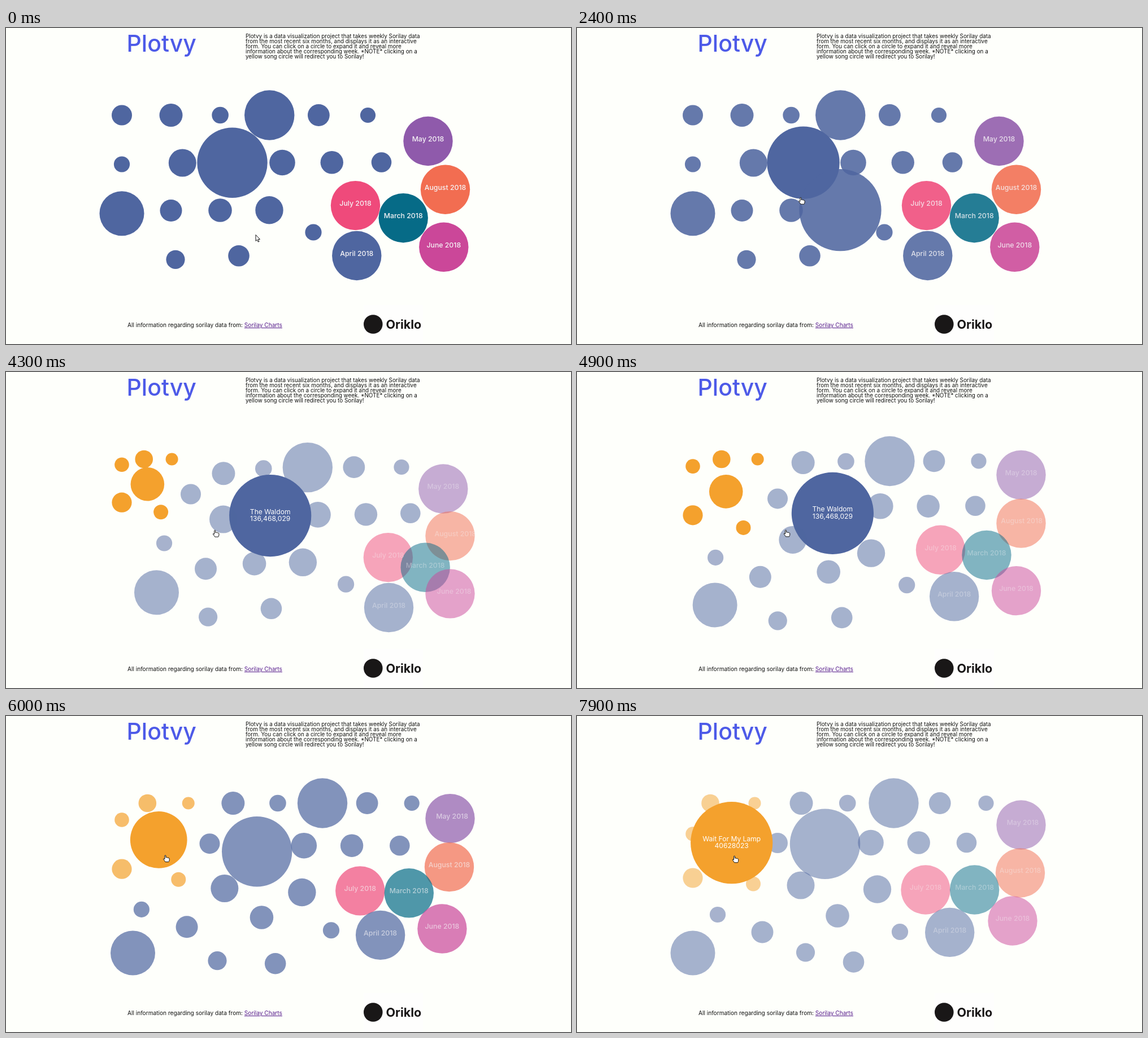
Animation, 1000 px wide and 560 px high, one loop 8 s. Source, as an HTML page:

```html
<!DOCTYPE html>
<html lang="en">
<head>
<meta charset="utf-8">
<title>Plotvy</title>
<style>
  html, body { margin: 0; width: 100%; height: 100%; overflow: hidden; background: #fefffb; }
  svg { display: block; width: 100%; height: 100%; }
  text { font-family: Montserrat, Inter, sans-serif; }
  .title { font-size: 41px; font-weight: 500; fill: #4d5ae8; }
  .intro { font-size: 9.9px; fill: #111; }
  .foot { font-size: 10.15px; fill: #111; }
  .link { fill: #551a8b; text-decoration: underline; }
  .mark { font-size: 21.5px; font-weight: 700; fill: #191717; }
  .month { font-size: 12.3px; font-weight: 500; fill: #f6f4f6; text-anchor: middle; }
  .label { font-size: 12.1px; fill: #fff; text-anchor: middle; }
</style>
</head>
<body>
<svg viewBox="0 0 1000 560">
  <rect width="1000" height="560" fill="#fefffb"/>
  <text class="title" x="213.5" y="42">Plotvy</text>
  <g id="intro"></g>
  <text class="foot" x="215" y="530">All information regarding sorilay data from: <tspan class="link">Sorilay Charts</tspan></text>
  <rect x="633" y="491" width="105" height="69" fill="#fefefd"/>
  <circle cx="649.8" cy="525" r="16.8" fill="#191717"/>
  <text class="mark" x="672.5" y="532.5">Oriklo</text>
  <g id="dots"></g>
  <g id="texts"></g>
  <g id="cursor" fill="#fff" stroke="#111" stroke-width="1" stroke-linejoin="round">
    <path id="arrow" d="M0 0V11L2.5 8.7L4.2 12.6L6 11.8L4.3 8H7.5Z"/>
    <path id="hand" d="M-1 1Q-1 0 0 0Q1 0 1 1V4Q3 3.4 3.5 4.4Q5.5 4 6 5Q7.3 5 7.3 6.5L7 9.5Q6.5 11 6 11.8H0Q-1 10 -3 7.5Q-3.8 6 -2.5 6L-1 7Z"/>
  </g>
</svg>
<script>
const LOOP = 8000, STEP = 100;
const BLUE = '#4f66a0', ORANGE = '#f4a12d';
const BURST = 4000, FOCUS_R = 72.6, MONTH_R = 43.7, MAX_X = 786;
const corner = [205, 154.5];

const $ = id => document.getElementById(id);
const mix = (a, b, p) => a + (b - a) * p;
const ramp = (t, from, length) => Math.max(0, Math.min(1, (t - from) / length));
const show = (el, on) => el.setAttribute('visibility', on ? 'visible' : 'hidden');
function add(parent, tag, attrs, content = '') {
  const el = document.createElementNS('http://www.w3.org/2000/svg', tag);
  for (const k in attrs) el.setAttribute(k, attrs[k]);
  el.textContent = content;
  $(parent).appendChild(el);
  return el;
}

[
  'Plotvy is a data visualization project that takes weekly Sorilay data',
  'from the most recent six months, and displays it as an interactive',
  'form. You can click on a circle to expand it and reveal more',
  'information about the corresponding week. *NOTE* clicking on a',
  'yellow song circle will redirect you to Sorilay!'
].forEach((line, i) => add('intro', 'text', { class: 'intro', x: 424, y: 17.7 + 9 * i }, line));

// Walks through [time, x, y] stops; each leg eases out by the given power
function along(stops, t, power) {
  const next = stops.findIndex(s => t < s[0]);
  if (next === 0) return stops[0].slice(1);
  if (next < 0) return stops[stops.length - 1].slice(1);
  const [a, b] = [stops[next - 1], stops[next]];
  const p = 1 - (1 - ramp(t, a[0], b[0] - a[0])) ** power;
  return [mix(a[1], b[1], p), mix(a[2], b[2], p)];
}

// New circles in the corner push the others away; the right wall takes up the shock
function pushed([x, y]) {
  const [dx, dy] = [x - corner[0], y - corner[1]];
  const room = Math.min(1, (840 - x) / 200);
  return [
    x + room * (56 + 66 * Math.exp(-Math.hypot(dx / 150, dy / 70))),
    y + room * (14 + 48 * Math.exp(-dx / 60))
  ];
}

const dots = [];
function dot(r, start, settle, rest, opts) {
  const d = { r, fill: BLUE, born: 0, burst: pushed(start), text: [], ...opts };
  d.stops = [[BURST, ...start], [4300, ...d.burst], [5400, ...settle], [7900, ...rest]];
  d.el = add('dots', 'circle', { fill: d.fill });
  if (d.month) d.text = [add('texts', 'text', { class: 'month' }, d.month)];
  if (d.lines) d.text = d.lines.map(s => add('texts', 'text', { class: 'label' }, s));
  dots.push(d);
}
// Evenly spaced circles between two end places, for each of the three poses
function row(radii, ...poses) {
  radii.forEach((r, i) => {
    const p = i / (radii.length - 1);
    dot(r, ...poses.map(([x1, y1, x2, y2]) => [mix(x1, x2, p), mix(y1, y2, p)]));
  });
}
function song(r, settle, rest, opts) {
  const burst = corner.map((c, i) => mix(c, settle[i], .72));
  dot(r, corner, settle, rest, { fill: ORANGE, born: BURST + STEP, burst, ...opts });
}
const month = (name, fill, ...poses) => dot(MONTH_R, ...poses, { fill, month: name + ' 2018' });

row([20.5, 14.8, 44.2, 19.4, 13.6],
  [292, 154.5, 640.5, 154.5], [405, 154.5, 714.5, 154.5], [397, 154.5, 724, 154.5]);
row([22.8, 20.2, 17.8],
  [489, 238.5, 664.5, 238], [532, 233, 701.5, 233], [520, 224.5, 689.5, 224.5]);
dot(18, corner, [364, 227], [355, 225]);
dot(14.1, [205, 241.5], [234, 337], [249, 352]);
dot(39.5, [205, 328.7], [237, 420], [205, 420]);
dot(19.5, [292, 323.5], [315, 368], [328, 383]);
dot(20.8, [379, 323], [447, 359], [461, 354]);
dot(14.6, [544, 362], [578, 378], [571.5, 382.5]);
dot(16.6, [300, 410.3], [354.5, 443], [404.5, 419]);
dot(18.8, [412, 403.8], [468.5, 440.5], [489.5, 436]);

month('May', '#8f5aab', [747, 200.5], [790, 174.5], [789, 193]);
month('August', '#f26d51', [777.5, 286.2], [784.5, 261], [784.5, 278]);
month('July', '#ef4a7b', [618.5, 314.6], [633, 311], [617, 308]);
month('March', '#066b87', [703.2, 336.7], [719.5, 317.5], [703.6, 308]);
month('April', BLUE, [620.8, 403.5], [664.5, 391.5], [659.7, 383.4]);
month('June', '#cb4799', [774.8, 388.3], [772.5, 386], [771, 363]);

song(12.8, [205, 168], [205, 209]);
song(15.8, [259.5, 154.5], [236, 154.5]);
song(11, [328, 154.5], [314.5, 154.5]);
song(13, [301, 284.7], [312, 297.5]);
song(17.6, [205, 261], [205, 287]);

// Circles the pointer visits, drawn on top
dot(62.2, [400.5, 238.7], [447.5, 249], [439, 226.7],
  { hover: [2350, 5050], lines: ['The Waldom', '136,468,029'] });
dot(24.7, [466, 322.7], [519, 316], [531.5, 307],
  { hover: [920, 2100], lines: ['Rocco Vee', '24,447,827'] });
dot(24.5, [312.3, 239], [381, 309], [396, 300], { hover: [5050, 5250] });
song(29.8, [268, 216], [273.7, 224.7],
  { hover: [5880, LOOP], lines: ['Wait For My Lamp', '40628023'] });

const visited = dots.filter(d => d.hover);
const pointer = [
  [300, 442, 366.5], [900, 459.5, 342], [2000, 459.5, 342], [2500, 380, 290], [3300, 370, 281],
  [5000, 369.5, 280], [5400, 314.5, 250], [5850, 283, 247], [6500, 278.5, 246], [7900, 278.5, 248]
];

// A hover dims every other circle that already exists
function opacity(d, t) {
  let dimmed = 0;
  for (const v of visited) {
    const [on, off] = v.hover;
    if (v !== d && on >= d.born) dimmed += ramp(t, on, 200) - ramp(t, off, 200);
  }
  return 1 - dimmed / 2;
}
function radius(d, t) {
  if (!d.hover) return d.r;
  const [on, off] = d.hover;
  return mix(d.r, FOCUS_R, ramp(t, on, 250) - ramp(t, off + 350, 300));
}

function draw(t) {
  for (const d of dots) {
    const [x, y] = along(d.stops, t, 1.8), alpha = opacity(d, t);
    d.el.setAttribute('cx', Math.min(x, MAX_X));
    d.el.setAttribute('cy', y);
    d.el.setAttribute('r', radius(d, t));
    d.el.setAttribute('opacity', alpha);
    show(d.el, t >= d.born);
    d.text.forEach((el, i) => {
      el.setAttribute('x', x);
      el.setAttribute('y', d.month ? y + .3 : y - 3 + 12.3 * i);
      if (d.month) el.setAttribute('opacity', 1 - (1 - alpha) * 1.3);
      else show(el, t >= d.hover[0] + 200 && t < d.hover[1]);
    });
  }
  const pointing = visited.some(({ hover: [on, off] }) => t >= on && t < off);
  $('cursor').setAttribute('transform', `translate(${along(pointer, t, 1)})`);
  show($('hand'), pointing);
  show($('arrow'), !pointing);
}

const start = performance.now();
function tick() {
  const t = (performance.now() - start) % LOOP;
  draw(Math.floor(t / STEP) * STEP);
  requestAnimationFrame(tick);
}
tick();
</script>
</body>
</html>
```
